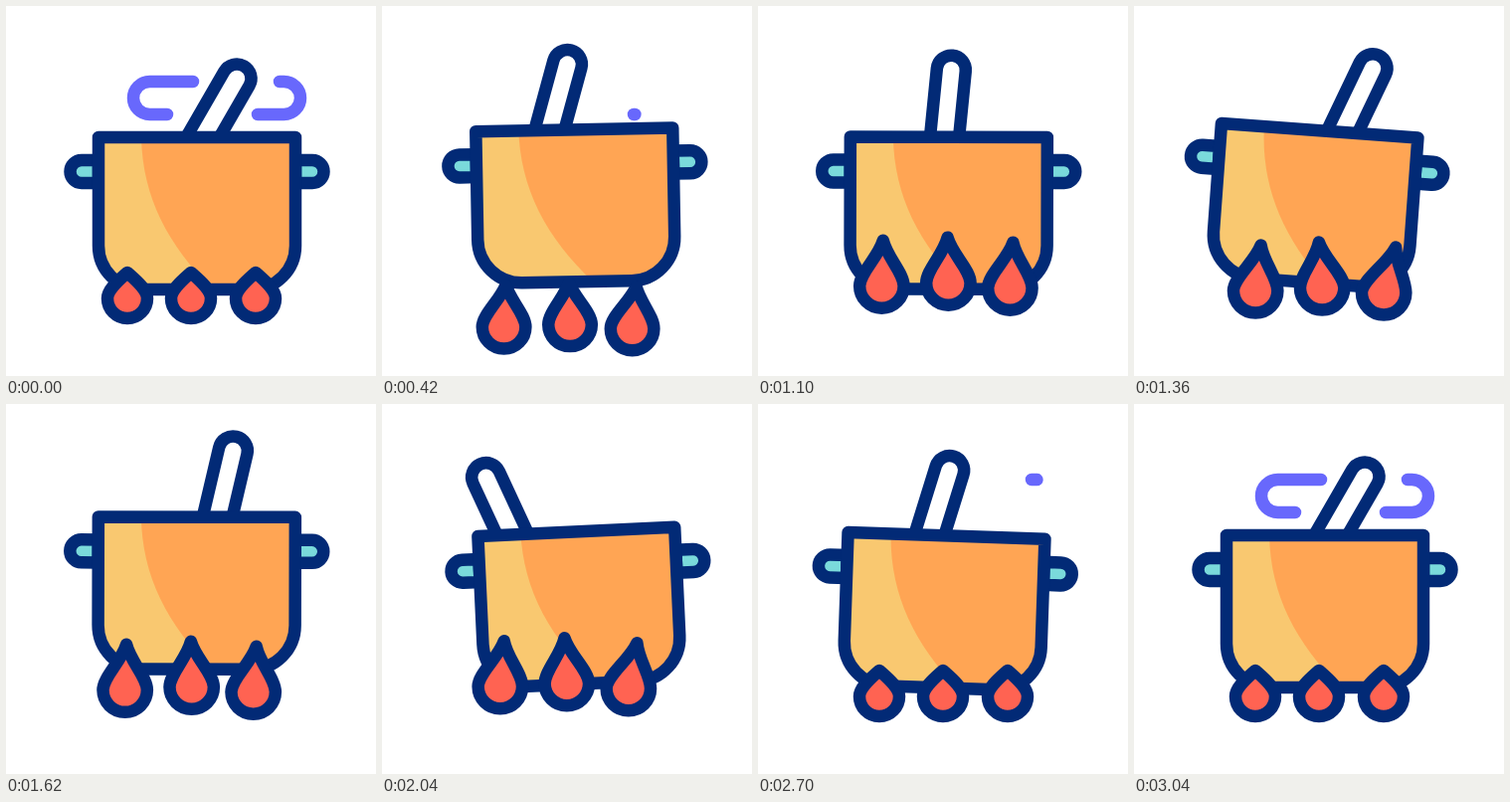
Write an HTML page that moves like this. It is 372 px wide and 372 px high and loops after 3.14 s.

```html
<!DOCTYPE html>
<html lang="en">
<head>
<meta charset="utf-8">
<title>Cooking pot</title>
<style>
  html, body { margin: 0; width: 100%; height: 100%; overflow: hidden; background: #fff; }
  svg { display: block; width: 100vw; height: 100vh; }
  .line { stroke: #022a76; stroke-width: 12.5; stroke-linejoin: round; }
  .swirl { fill: none; stroke: #6868fc; stroke-width: 12.5; stroke-linecap: round; }
</style>
</head>
<body>
<svg viewBox="0 0 372 372">
  <defs>
    <path id="body" d="M93 132H291V241a44 44 0 0 1-44 44H137a44 44 0 0 1-44-44Z"/>
    <clipPath id="inside"><use href="#body"/></clipPath>
  </defs>
  <path class="swirl" pathLength="1" d="M188 76H144.500a16.500 16.500 0 0 0 0 33H162"/>
  <path class="swirl" pathLength="1" d="M275 76H279.500a16.500 16.500 0 0 1 0 33H253"/>
  <path id="spoon" class="line" fill="#fff" d="M-14.500 110V0A14.500 14.500 0 0 1 14.500 0V110Z"/>
  <g id="pot">
    <path class="line" fill="#7adadb" d="M93 155H76a11.500 11.500 0 0 0 0 23H93ZM291 155H308a11.500 11.500 0 0 1 0 23H291Z"/>
    <use href="#body" fill="#f9c870"/>
    <path clip-path="url(#inside)" fill="#ffa554" d="M136 128C136 190 162 240 208 285H300V128Z"/>
    <use href="#body" class="line" fill="none"/>
  </g>
  <g id="fire" class="line" fill="#ff6352"></g>
</svg>
<script>
const LOOP = 3140, STEP = 20;

const mix = (a, b, u) => a + (b - a) * u;
const clamp = u => Math.min(1, Math.max(0, u));

// Sine-eased swing from one turning point [time, value] to the next.
const swing = (...turns) => t => turns.reduce((value, [time, next], i) => {
  if (!i) return next;
  const u = clamp((t - turns[i - 1][0]) / (time - turns[i - 1][0]));
  return mix(value, next, (1 - Math.cos(Math.PI * u)) / 2);
}, 0);

const potAngle = swing([220, 0], [830, -4.2], [1360, 4.2], [1890, -4.2], [2420, 4.2], [2960, 0]);
const potLift = swing([220, 0], [680, -18.5], [1140, 0], [1640, -18.5], [2180, 0]);
const spoonX = swing([220, 232], [720, 100], [1340, 240], [1500, 240], [2160, 93], [3000, 232]);
const spoonTilt = swing([220, 30], [760, -19], [1400, 26], [2060, -25], [3000, 30]);

const fireGrowth = swing([220, 0], [500, 1], [2080, 1], [2640, 0]);
const fireBottom = swing([220, 320], [400, 351], [720, 305], [1560, 316], [1980, 312], [2500, 320]);
const fireSway = swing([220, 0], [900, 3], [1900, -3.5], [2600, 0]);

const erase = swing([200, 0], [440, 1]);
const draw = swing([2640, 0], [3000, 1]);

// dx and dy shift the grown flame, lean is how far its tip bends.
const flames = [
  { x: 122, dx: 0, dy: 0, lean: 5 },
  { x: 186, dx: 3, dy: -3, lean: -3 },
  { x: 251, dx: 0, dy: 2, lean: 11 }
];
for (const f of flames) {
  f.el = document.createElementNS('http://www.w3.org/2000/svg', 'path');
  document.getElementById('fire').append(f.el);
}

// Round body at the bottom, sides running up to a pointed tip.
function flamePath(x, bottom, lean, grow) {
  const r = mix(20, 22.2, grow);
  const y = bottom - 6 - r, top = bottom - mix(52, 74, grow), tip = x + lean;
  const bend = tip - lean * 0.35, wide = mix(9, 4.5, grow);
  const cy = top + mix(8, 17, grow), side = y - mix(9, 13, grow);
  return `M${tip} ${top}C${bend + wide} ${cy} ${x + r} ${side} ${x + r} ${y}`
    + `A${r} ${r} 0 0 1 ${x - r} ${y}C${x - r} ${side} ${bend - wide} ${cy} ${tip} ${top}Z`;
}

const pot = document.getElementById('pot');
const spoon = document.getElementById('spoon');
const swirls = document.querySelectorAll('.swirl');

function render(t) {
  const angle = potAngle(t), lift = potLift(t), tilt = spoonTilt(t);
  pot.setAttribute('transform', `translate(0 ${lift}) rotate(${angle} 178 60)`);
  const spoonY = 64.5 + 0.0135 * (tilt - 5) ** 2 + lift;
  spoon.setAttribute('transform', `translate(${spoonX(t)} ${spoonY}) rotate(${tilt})`);

  const late = t > LOOP / 2;
  const from = late ? 0 : erase(t), to = late ? draw(t) : 1;
  for (const s of swirls) {
    s.style.visibility = to - from < 0.01 ? 'hidden' : 'visible';
    s.style.strokeDasharray = to - from === 1 ? 'none' : `${to - from} 2`;
    s.style.strokeDashoffset = -from;
  }

  const grow = fireGrowth(t), bottom = fireBottom(t), sway = fireSway(t);
  const bend = grow * (0.25 + 0.2 * Math.abs(angle));
  for (const f of flames) {
    f.el.setAttribute('d', flamePath(
      f.x + sway + f.dx * grow, bottom + f.dy * grow, f.lean * bend, grow));
  }
}

const start = performance.now();
function tick() {
  const t = (performance.now() - start) % LOOP;
  render(Math.floor(t / STEP) * STEP);
  requestAnimationFrame(tick);
}
tick();
</script>
</body>
</html>
```
